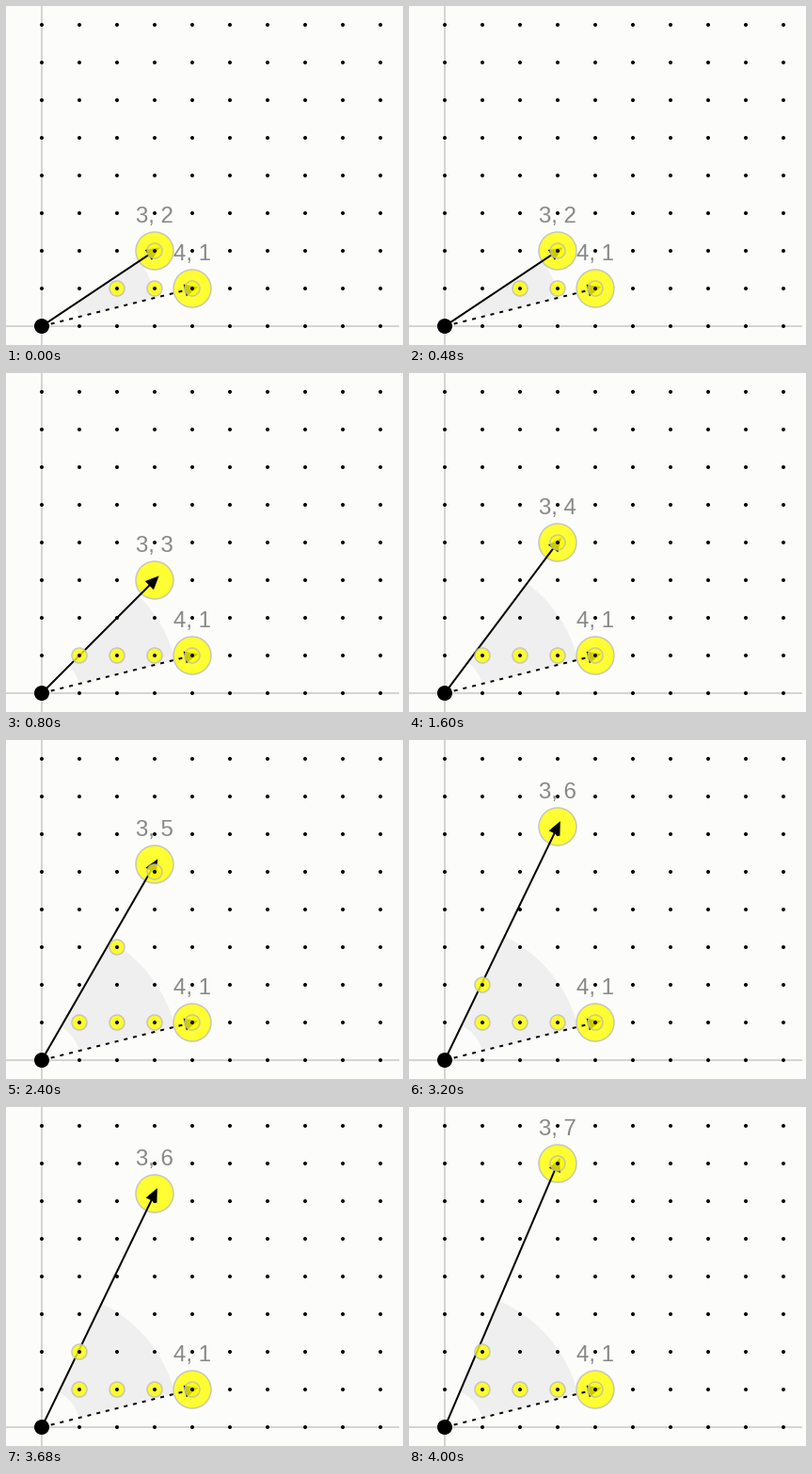
Write a matplotlib script that moves like this. It is 422 by 360 pixels and loops after 4800 ms.

```python
import numpy as np
import matplotlib.pyplot as plt
from matplotlib.animation import FuncAnimation
from matplotlib.patches import Circle, Polygon, Wedge

W, H = 422, 360
DPI = 64
PT = 72 / DPI  # points per pixel
UNIT = 40

YELLOW = "#ffff00"
RIM = "#bbbbbb"
FIXED = np.array([160, 40])
TIP_HEIGHTS = [80, 120, 160, 208, 248, 280]
BASE_ROW = [(1, 1), (2, 1), (3, 1), (4, 1)]
LATTICE_PATHS = [
    [(2, 1), (3, 1), (4, 1), (3, 2)],
    BASE_ROW,
    BASE_ROW + [(3, 4)],
    BASE_ROW + [(2, 3), (3, 5)],
    BASE_ROW + [(1, 2)],
    BASE_ROW + [(1, 2), (3, 7)],
]

fig = plt.figure(figsize=(W / DPI, H / DPI), dpi=DPI, facecolor="#fcfcfa")
# Pixel units, y upward, with the vectors' start at (0, 0)
ax = fig.add_axes([0, 0, 1, 1])
ax.set_xlim(-38, W - 38)
ax.set_ylim(-20, H - 20)
ax.axis("off")

parts = []


def add(patch):
    parts.append(ax.add_patch(patch))


def disc(center, radius, z):
    add(Circle(center, radius, fc=YELLOW, ec="none", alpha=0.8, zorder=z))
    add(Circle(center, radius, fc="none", ec=RIM, lw=1.5 * PT, alpha=0.8,
               zorder=z))


def arrow(tip, dashed=False):
    style = (0, (2, 3)) if dashed else "-"
    parts.extend(ax.plot([0, tip[0]], [0, tip[1]], color="black", lw=2 * PT,
                         ls=style, dash_capstyle="butt",
                         solid_capstyle="butt", zorder=4))
    along = tip / np.hypot(*tip)
    across = np.array([-along[1], along[0]])
    back = tip - 8 * along
    add(Polygon([tip + 6.5 * along, back + 6.5 * across, back - 6.5 * across],
                fc="black", ec="none", zorder=4))


def label(tip):
    text = f"{round(tip[0] / UNIT)}, {round(tip[1] / UNIT)}"
    parts.append(ax.text(tip[0], tip[1] + 30, text, color="#888888",
                         family="Liberation Sans", size=24 * PT,
                         ha="center", va="baseline", zorder=3))


def angle(v):
    return np.degrees(np.arctan2(v[1], v[0]))


def draw(i):
    for part in parts:
        part.remove()
    parts.clear()

    tip = np.array([120, TIP_HEIGHTS[i]])
    outer = min(np.hypot(*tip), np.hypot(*FIXED)) - 19
    add(Wedge((0, 0), outer, angle(FIXED), angle(tip), width=outer - 41,
              fc="#efefef", ec="none", zorder=1))
    for end in (FIXED, tip):
        disc(end, 20, 2)
        label(end)
    arrow(FIXED, dashed=True)
    arrow(tip)
    for x, y in LATTICE_PATHS[i]:
        disc((x * UNIT, y * UNIT), 8, 5)
    return parts


ax.plot([-38, 380], [0, 0], color="#d4d4d2", lw=2 * PT, zorder=0,
        solid_capstyle="butt")
ax.plot([0, 0], [-20, 340], color="#d4d4d2", lw=2 * PT, zorder=0,
        solid_capstyle="butt")
for col in range(10):
    for row in range(9):
        ax.add_patch(Circle((col * UNIT, row * UNIT), 2, fc="black",
                            ec="none", zorder=6))
ax.add_patch(Circle((0, 0), 8, fc="black", ec="none", zorder=7))

anim = FuncAnimation(fig, draw, frames=len(TIP_HEIGHTS), init_func=lambda: parts,
                     interval=800, repeat=True, repeat_delay=0, blit=False)
plt.show()
```
